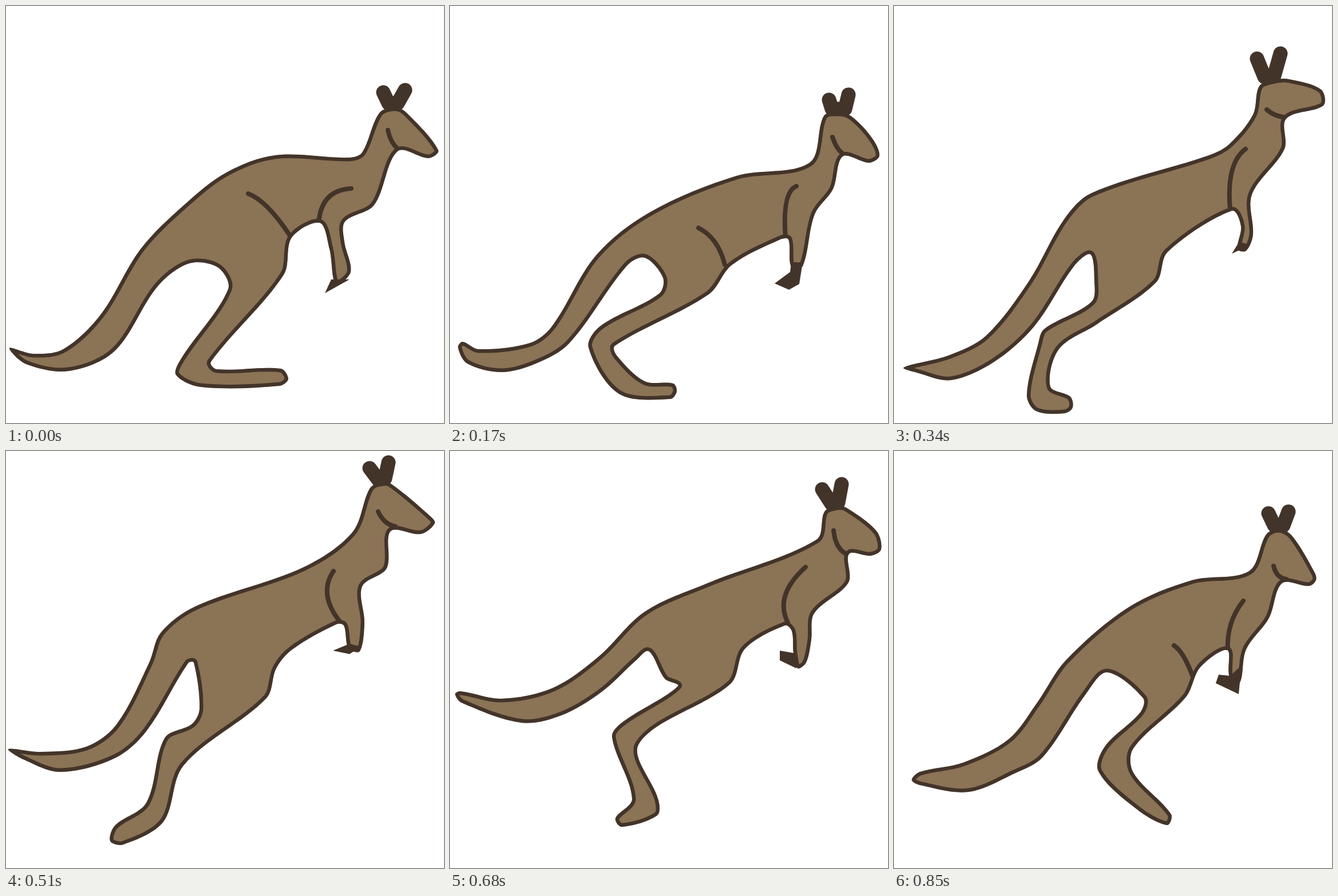
Animation, 765 px wide and 729 px high, one loop 1020 ms. Source, as an HTML page with a canvas:

```html
<!DOCTYPE html>
<html lang="en">
<head>
<meta charset="utf-8">
<title>Hopping kangaroo</title>
<style>
html, body { margin: 0; width: 100%; height: 100%; overflow: hidden; background: #fff; }
canvas { display: block; width: 100vw; height: 100vh; }
</style>
</head>
<body>
<canvas width="765" height="729"></canvas>
<script>
const STEP = 170;
const INK = '#43342a';
const FUR = '#8b7355';
const ctx = document.querySelector('canvas').getContext('2d');

const points = text => text.split(' ').map(p => p.split(',').map(Number));

// Closed smooth curve; handles scale with the side they lie on.
function blob(...parts) {
  const pts = points(parts.join(' '));
  const at = i => pts[(i + pts.length) % pts.length];
  const gap = (a, b) => Math.hypot(b[0] - a[0], b[1] - a[1]);
  const handle = (i, dir) => {
    const p = at(i), a = at(i - 1), b = at(i + 1);
    const k = dir * 0.33 * gap(p, at(i + dir)) / (gap(a, p) + gap(p, b));
    return [p[0] + (b[0] - a[0]) * k, p[1] + (b[1] - a[1]) * k];
  };
  const path = new Path2D();
  path.moveTo(...pts[0]);
  pts.forEach((_, i) => path.bezierCurveTo(...handle(i, 1), ...handle(i + 1, -1), ...at(i + 1)));
  path.closePath();
  return path;
}

const line = text => new Path2D('M' + points(text).join('L'));

function arc(text) {
  const [a, c, b] = points(text);
  return new Path2D(`M${a}Q${c} ${b}`);
}

const pose = (back, belly, ears, paw, ...marks) => ({
  body: blob(back, belly),
  ears: line(ears),
  paw: new Path2D(`M${points(paw).join('L')}Z`),
  marks: marks.map(arc)
});

const crouch = pose(
  '6,598 48,608 100,600 165,540 235,425 312,347 385,291 470,261 600,265 622,256 652,187 680,177 700,187 755,252',
  '738,266 684,254 643,348 592,377 591,412 602,465 576,486 565,425 548,379 499,405 485,470 358,622 368,635 480,634 493,652 478,664 340,666 297,645 305,618 388,495 370,457 320,450 265,490 190,603 110,638 35,626',
  '659,151 668,170 684,170 697,147',
  '600,478 557,502 568,478',
  '667,217 672,240 685,250', '603,319 550,322 546,380', '423,328 455,340 495,400');

const lean = pose(
  '14,597 22,587 50,600 140,589 178,560 255,436 350,360 500,297 628,274 653,192 682,186 704,195 738,232 750,262',
  '732,274 686,263 669,320 637,364 616,455 596,456 591,408 577,408 492,453 452,504 288,594 292,612 340,656 390,660 396,674 385,687 295,678 242,597 262,560 365,503 372,475 340,440 309,454 208,590 150,625 90,640 30,625',
  '662,164 667,180 690,180 696,155',
  '596,448 594,465 567,485 592,496 610,486 616,448',
  '668,229 675,250 685,257', '605,315 580,325 586,405', '434,388 468,405 480,452');

const push = pose(
  '17,632 95,611 160,577 235,482 297,373 345,327 550,261 585,242 627,190 638,140 665,129 690,128 746,146 750,174',
  '685,197 682,250 625,330 627,400 615,428 600,425 606,385 590,358 478,430 458,483 355,556 288,600 273,665 308,683 312,702 298,712 248,708 232,680 252,590 262,565 345,517 350,480 343,434 315,454 245,560 175,622 100,654 40,641',
  '634,92 647,124 664,122 675,83',
  '622,418 590,433 603,412',
  '651,181 665,194 688,195', '614,250 580,275 587,355');

const leap = pose(
  '4,521 60,526 140,517 193,478 250,370 270,318 330,272 520,203 605,142 635,66 655,54 672,57 740,113 749,126',
  '725,145 672,140 665,205 622,237 626,300 618,350 598,345 590,305 577,303 500,347 472,380 455,432 310,550 275,648 205,688 182,682 190,655 245,615 277,502 325,477 338,450 328,370 318,371 245,490 190,537 95,561 30,539',
  '635,30 650,50 662,48 668,20',
  '600,337 571,349 600,355 620,342',
  '650,106 660,128 680,132', '572,210 545,250 583,298');

const fall = pose(
  '9,425 18,420 90,433 180,414 260,359 340,281 450,231 640,155 654,106 675,97 692,99 745,140 753,172',
  '735,183 697,180 696,230 636,284 631,330 622,370 607,380 600,354 597,315 585,305 515,346 490,407 330,512 364,610 362,637 300,657 289,642 318,608 283,500 300,475 398,411 375,398 347,350 325,366 265,421 195,462 125,475 20,440',
  '650,67 666,92 678,90 684,58',
  '605,354 576,349 576,366 605,380',
  '670,139 673,170 692,180', '621,203 566,252 590,300');

const land = pose(
  '31,575 45,561 120,545 200,504 250,440 300,366 410,273 520,226 620,210 650,146 672,136 695,148 735,213 737,226',
  '725,236 678,231 655,292 615,347 604,405 586,395 582,348 535,378 510,430 418,520 418,562 484,635 477,654 425,627 357,560 368,517 430,457 435,432 372,387 335,425 260,535 210,564 130,596 45,584',
  '654,109 664,130 680,130 689,106',
  '587,393 567,391 562,406 602,425 607,375',
  '663,201 668,222 685,224', '610,262 580,300 583,350', '489,340 505,350 521,392');

const hop = [crouch, lean, push, leap, fall, land];

function stroke(path, width) {
  ctx.lineWidth = width;
  ctx.stroke(path);
}

function paint({ body, ears, paw, marks }) {
  ctx.clearRect(0, 0, 765, 729);
  ctx.lineCap = ctx.lineJoin = 'round';
  ctx.strokeStyle = INK;
  ctx.save();
  ctx.clip(body);
  ctx.fillStyle = FUR;
  ctx.fill(body);
  stroke(body, 13);
  marks.forEach(m => stroke(m, 8));
  ctx.restore();
  ctx.fillStyle = INK;
  ctx.fill(paw);
  stroke(ears, 25);
}

const start = performance.now();
let shown;

function tick(now) {
  const next = hop[Math.floor(Math.max(0, now - start) / STEP) % hop.length];
  if (next !== shown) paint(shown = next);
  requestAnimationFrame(tick);
}
tick(start);
</script>
</body>
</html>
```
